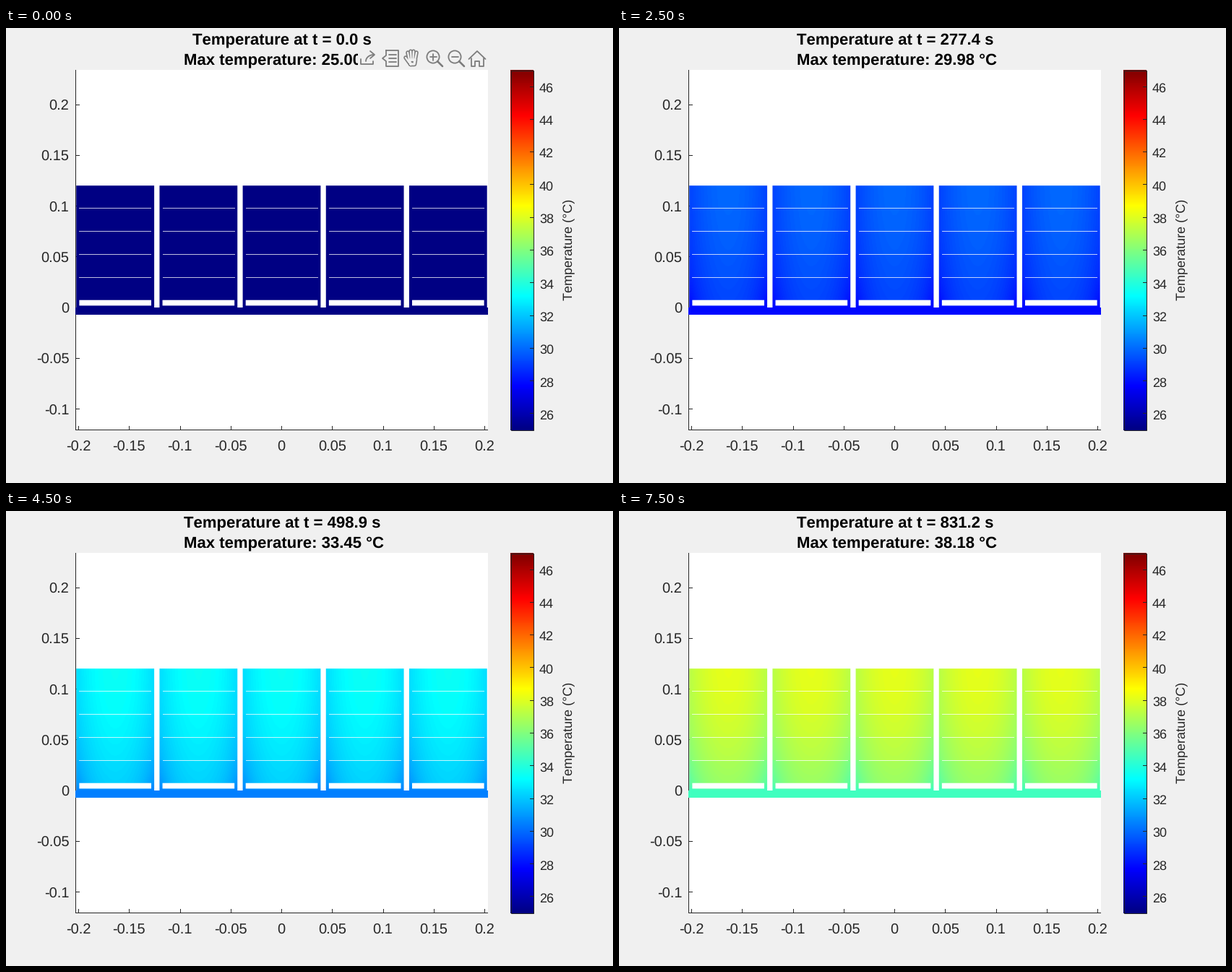
A matplotlib script that plays this animation: 840x630 px, repeating every 8000 ms.

```python
import numpy as np
import matplotlib.pyplot as plt
from matplotlib.animation import FuncAnimation
from matplotlib.colors import ListedColormap
from matplotlib.patches import Circle, Rectangle

W, H, DPI = 840, 630, 100
FRAMES, INTERVAL = 16, 500
INK, BG, ICON = "#262626", "#f0f0f0", "#7c7c7c"
T_MIN, T_MAX = 25, 47

plt.rcParams.update({
    "font.family": "Liberation Sans",
    "text.kerning_factor": 6,
    "text.hinting": "none",
})

fig = plt.figure(figsize=(W / DPI, H / DPI), dpi=DPI, facecolor=BG)
ax = fig.add_axes([0, 0, 1, 1])


def pt(px):
    return px * 72 / DPI


def box(x, y, w, h, color, z=1, **kw):
    return ax.add_patch(Rectangle((x, y), w, h, fc=color, lw=0, zorder=z,
                                  antialiased=False, **kw))


def label(x, y, s, px, ha="center", color=INK, **kw):
    return ax.text(x, y, s, fontsize=pt(px), ha=ha, va="baseline",
                   color=color, **kw)


def jet_map(n=256):
    v = np.arange(1, n + 1) / n
    rgb = [np.clip(1.5 - abs(4 * v - c), 0, 1) for c in (3, 2, 1)]
    return ListedColormap(np.stack(rgb, axis=1))


JET = jet_map()

# Plot area and its axes
X0, X1, Y0, Y1 = 96, 667, 58, 556
CX, CY, STEP = 381.5, 387.2, 70.25
box(X0, Y0, X1 - X0, Y1 - Y0, "white", 0)
box(X0, Y0, 1, Y1 - Y0, INK)
box(X0, Y1, X1 - X0, 1, INK)
for k in range(-4, 5):
    x = CX + STEP * k
    box(np.floor(x), Y1 - 5, 1, 5, INK)
    label(x - 0.5, 586, f"{0.05 * k:g}", 20)
    if k >= -2:
        y = CY - STEP * k
        box(X0, np.floor(y), 6, 1, INK)
        label(87.4, y + 7.6, f"{0.05 * k:g}", 20, "right")

# Colour bar
BAR, BAR_W = 698, 32
ax.imshow(np.linspace(1, 0, 256)[:, None], cmap=JET, vmin=0, vmax=1,
          extent=(BAR, BAR + BAR_W, Y1 + 1, Y0), aspect="auto",
          interpolation="nearest")
ax.add_patch(Rectangle((BAR + 0.5, Y0 + 0.5), BAR_W - 1, Y1 - Y0, fill=False,
                       ec=INK, lw=pt(1), zorder=3))
for v in range(T_MIN + 1, T_MAX, 2):
    y = Y1 + 0.5 - (v - T_MIN) * (Y1 - Y0) / (T_MAX - T_MIN)
    box(BAR + BAR_W - 5, np.floor(y), 5, 1, INK, 3)
    label(738, y + 7.8, str(v), 18, "left")
label(783.6, 306.6, "Temperature (°C)", 18, rotation=90,
      rotation_mode="anchor")

# Battery cells on a cooling plate, sampled per pixel with soft edges
TOP, CELL_END, FOOT, PLATE, BOTTOM = 218.2, 376.7, 384.4, 387, 397
PITCH, HALF, INNER, CELLS = 115.15, 53.9, 49.8, 5


def inside(d):
    return np.clip(d + 0.5, 0, 1)


gx, gy = np.meshgrid(np.arange(X0, X1) + 0.5, np.arange(217, BOTTOM) + 0.5)
dx = abs(gx - CX - PITCH * np.clip(np.round((gx - CX) / PITCH), -2, 2))
plate = gy > PLATE
slot = inside(INNER - dx) * inside(gy - CELL_END) * inside(FOOT - gy)
stack = inside(HALF - dx) * inside(gy - TOP) * (1 - slot)
cover = np.where(plate, 1, stack)

u = dx / HALF
h = np.clip((CELL_END - gy) / (CELL_END - TOP), 0, 1)
level = np.clip(np.floor(h * CELLS), 0, CELLS - 1) / CELLS
h_cell = level + 0.5 * (h - level)
below = np.clip((gy - CELL_END) / (PLATE - CELL_END), 0, 1)


def seconds(i):
    return 55.385 * i + 0.43 if i else 0.0


def peak(t):
    return T_MIN + 0.0259275 * t**0.9399 * np.exp(-t / 9481)


def field(t):
    def rise(amount, tau):
        return amount * (1 - np.exp(-t / tau))

    side, low, cold = rise(1.0, 150), rise(2.3, 700), rise(4.1, 390)
    drop = side * u**2 + low * (1 - h_cell)**2
    drop = drop + 0.5 * side * u**4 * np.exp(-h / 0.15)
    drop = drop + (cold - drop) * below
    return peak(t) - np.where(plate, cold, drop)


heat = ax.imshow(field(0), cmap=JET, vmin=T_MIN, vmax=T_MAX, alpha=cover,
                 extent=(X0, X1, BOTTOM, 217), aspect="auto",
                 interpolation="nearest", zorder=4)
for k in range(-2, 3):
    left = round(CX + PITCH * k - INNER)
    for j in range(1, CELLS):
        box(left, 377 - 32 * j, 2 * INNER, 1, "white", 5, alpha=0.75)

head = label(382.4, 22, "", 22.1, color="black", weight="bold")
sub = label(246, 50, "", 22.1, "left", color="black", weight="bold")

# Toolbar, shown only at the start
tools = [box(487, 29, 180, 28, BG, 6)]


def stroke(xs, ys, lw=1.8, color=ICON):
    tools.extend(ax.plot(xs, ys, color=color, lw=pt(lw), zorder=7,
                         solid_capstyle="round", solid_joinstyle="round"))


def ring(x, y, r):
    tools.append(ax.add_patch(Circle((x, y), r, fill=False, ec=ICON,
                                     lw=pt(1.8), zorder=7)))


def share(x):
    a = np.linspace(0, np.pi / 2, 12)
    stroke(x - 11 * np.cos(a) + 7, 46 - 9 * np.sin(a))
    stroke([x + 2, x + 8, x + 2], [32, 37, 42])
    stroke([x - 11, x - 11, x + 6, x + 6], [43, 50, 50, 46])


def note(x):
    stroke(x + np.array([-6, 11, 11, -6, -6, -11, -6, -6]),
           [31, 31, 53, 53, 46, 42, 38, 31])
    for y in (37, 42, 47):
        stroke([x - 2, x + 8], [y, y])


def hand(x):
    for lw, color in ((5.6, ICON), (2.4, BG)):
        for f in range(4):
            lean = f - 1.5
            stroke([x + 2.6 * lean, x + 4 * lean],
                   [45, 32 + 0.9 * lean**2], lw, color)
        stroke([x - 4, x - 9], [48, 41], lw, color)
        stroke([x - 2, x + 3, x + 4, x - 4, x - 2], [50, 50, 44, 44, 50],
               lw + 1, color)


def lens(x, plus):
    ring(x, 40, 8.6)
    stroke([x + 6, x + 13], [46, 53], 2.6)
    stroke([x - 4.5, x + 4.5], [40, 40])
    if plus:
        stroke([x, x], [35.5, 44.5])


def home(x):
    stroke([x - 11.5, x, x + 11.5], [43, 32, 43])
    for s in (-1, 1):
        stroke(x + s * np.array([8.5, 8.5, 3, 3, 0]), [42, 53, 53, 46, 46])


share(502)
note(532)
hand(562)
lens(591, True)
lens(621, False)
home(652)

ax.set_xlim(0, W)
ax.set_ylim(H, 0)
ax.axis("off")


def update(i):
    t = seconds(i)
    heat.set_data(field(t))
    head.set_text(f"Temperature at t = {t:.1f} s")
    sub.set_text(f"Max temperature: {peak(t):.2f} °C")
    for part in tools:
        part.set_visible(i == 0)
    return [heat, head, sub, *tools]


anim = FuncAnimation(fig, update, frames=FRAMES, interval=INTERVAL,
                     repeat=True, repeat_delay=0, blit=False)
plt.show()
```
